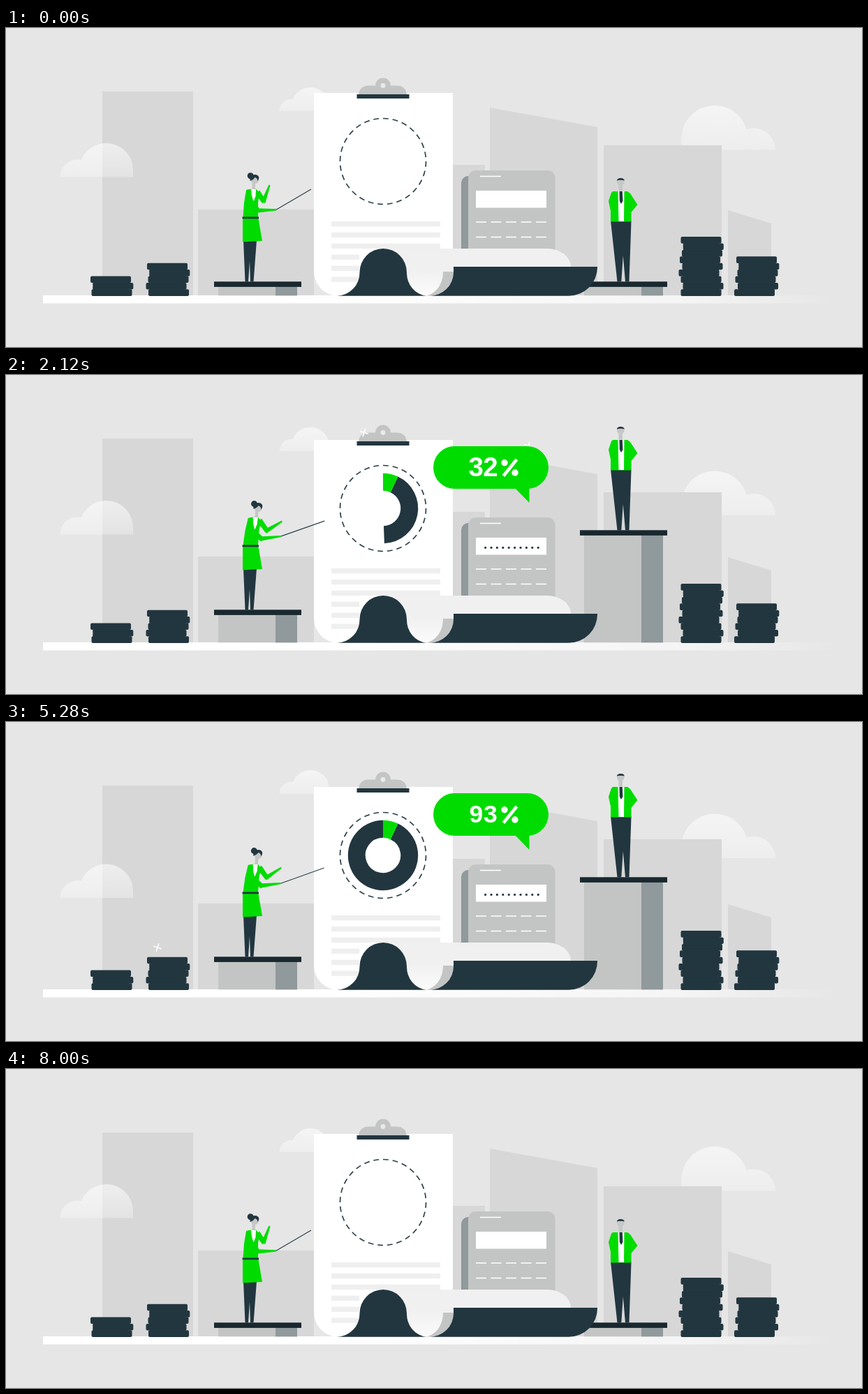
Write an HTML page that moves like this. It is 1226 by 457 pixels and loops after 8040 ms.

```html
<!DOCTYPE html>
<html lang="en">
<head>
<meta charset="utf-8">
<title>Report</title>
<style>
html, body { margin: 0; width: 100%; height: 100%; overflow: hidden; background: #e6e6e6; }
svg { display: block; width: 100vw; height: 100vh; }
text { font-family: "Liberation Sans", Arial, sans-serif; font-weight: 700; }
.dark { fill: #22363f; }
.green { fill: #00dc00; }
.grey { fill: #c3c5c4; }
.skin { fill: #c6c7c7; }
.white { fill: #fff; }
.town { fill: #d7d7d7; }
.side { fill: #90999b; }
.top { fill: #18282e; }
</style>
</head>
<body>
<svg viewBox="0 0 1226 457">
  <defs>
    <linearGradient id="mist" x2="0" y2="1">
      <stop offset="0" stop-color="#fff" stop-opacity=".58"/>
      <stop offset="1" stop-color="#fff" stop-opacity=".3"/>
    </linearGradient>
    <linearGradient id="floor">
      <stop offset=".35" stop-color="#fff"/>
      <stop offset=".8" stop-color="#fff" stop-opacity=".6"/>
      <stop offset="1" stop-color="#fff" stop-opacity="0"/>
    </linearGradient>
    <linearGradient id="roll" x2="0" y2="1">
      <stop offset=".45" stop-color="#f0f0f0"/>
      <stop offset="1" stop-color="#fbfbfb"/>
    </linearGradient>
  </defs>

  <path id="cloud3" fill="url(#mist)"/>
  <path class="town" d="M138 91H268V383H138ZM275 260H441V383H275ZM640 196H686V383H640ZM693 114L847 142V383H693ZM856 168H1025V383H856ZM1034 261L1096 280V383H1034Z"/>
  <path id="cloud1" fill="url(#mist)"/>
  <path id="cloud2" fill="url(#mist)"/>
  <rect x="53" y="383" width="1140" height="11.500" fill="url(#floor)"/>
  <g id="coins" class="dark"></g>

  <g id="standL"></g>
  <g id="standR"></g>

  <g id="man">
    <path class="dark" d="M866 276H895.500L895 292 892.500 363.500H887L883.800 326 881.300 363.500H875.500Z"/>
    <g id="chest">
      <path class="green" d="M869 234H890L894 237 904.500 253 895.500 264V277.500H866V262L863 248 867 236Z"/>
      <path class="white" d="M876.500 234H885.500L885 277H877.500Z"/>
      <path class="dark" d="M878.500 234H882.800L883.500 248 881 252 878.800 248Z"/>
    </g>
    <g id="manHead">
      <path class="skin" d="M877.500 222h5.500v11.500h-5.500Z"/>
      <circle class="skin" cx="880.300" cy="220.300" r="5.400"/>
      <path class="dark" d="M874.800 218.500Q875.500 215 880.300 215T885.800 218.500Q880.300 216.800 874.800 218.500Z"/>
    </g>
  </g>

  <path class="side" d="M690 212H662A10 10 0 0 0 652 222V330H690Z"/>
  <rect class="grey" x="662" y="204" width="124.500" height="135" rx="11"/>
  <rect class="white" x="673" y="233" width="101" height="24.500"/>
  <path stroke="#fff" stroke-width="1.500" d="M679 212.500H709"/>
  <path stroke="#fff" stroke-width="1.500" stroke-dasharray="15 6.500" d="M673 278H774M673 299.500H774"/>
  <g id="dots" class="dark"></g>
  <path id="caret" fill="none" stroke="#22363f" stroke-width="1.300" d="M755.500 239.500L749.500 244 755.500 248.500"/>

  <path class="white" d="M441 93H640V350H507A33 33 0 0 1 474 383.500A34 35 0 0 1 441 348Z"/>
  <g id="lines" fill="#efefef"></g>
  <path fill="url(#roll)" d="M540 316A34 34 0 0 1 574 350A30 33 0 0 0 602 383.500A30 34 0 0 0 626 349H641V342H809A34 26 0 0 0 775 316Z"/>
  <path class="grey" d="M626 349H641A34 34 0 0 1 607 383.500H600A27 34 0 0 0 626 349Z"/>
  <path class="dark" d="M474 383.700A33 33 0 0 0 506.500 350A33.700 34 0 0 1 574 350A31 33 0 0 0 602 383.700ZM641 342H847A41 41 0 0 1 806 383.700H606A34 34 0 0 0 641 349Z"/>
  <path class="grey" d="M505 96Q506 82.500 520 82.500H529A11 11 0 1 1 551 82.500H559Q573 82.500 574 96Z"/>
  <circle cx="540" cy="82.500" r="3.400" fill="#e9e9e9"/>
  <rect class="dark" x="502.500" y="95" width="75" height="6"/>
  <circle cx="540" cy="191" r="61.500" fill="none" stroke="#2c4149" stroke-width="1.700" pathLength="392" stroke-dasharray="8 6"/>
  <path id="ringDark" fill="none" stroke="#22363f" stroke-width="25"/>
  <path id="ringGreen" fill="none" stroke="#00dc00" stroke-width="25"/>

  <g id="woman">
    <path class="dark" d="M340 304H359L354.500 363.500H350L349 334 347 363.500H342.500Z"/>
    <path id="farArm" class="green"/>
    <g id="jacket">
      <path class="green" d="M344 232L348 231 358 230.500 363 236 361 250V271H339.500L341 250Z"/>
      <path class="white" d="M351 231H358L357.500 241 354.500 249 352 240Z"/>
    </g>
    <path id="nearArm" class="green"/>
    <path class="green" d="M339 273H361.500L367 305 339 306.500Z"/>
    <rect class="dark" x="338.500" y="270.500" width="23.500" height="2.700"/>
    <path id="pointer" stroke="#2c4149" stroke-width="1.200"/>
    <g id="womanHead">
      <path class="skin" d="M352.500 220h4.500v11h-4.500Z"/>
      <circle class="skin" cx="356.300" cy="217.500" r="5.600"/>
      <circle class="dark" cx="350.200" cy="211.800" r="4.500"/>
      <path class="dark" d="M349.500 219Q348.500 210.500 356 210Q362.500 210 362.300 215.500L360.500 219.500Q360.500 215 356.500 214Q354 218 349.500 219Z"/>
    </g>
  </g>

  <g id="sparks" fill="none" stroke="#fff" stroke-linecap="round"></g>

  <g id="bubble">
    <rect class="green" x="612" y="102" width="165" height="61" rx="30.500"/>
    <path class="green" d="M728 161H749.500V183Z"/>
    <text id="count" class="white" text-anchor="middle"></text>
    <path stroke="#fff" stroke-width="4.600" d="M712.500 144.500L731.500 121"/>
    <circle class="white" cx="714" cy="125.700" r="4.700"/>
    <circle class="white" cx="729" cy="140" r="4.700"/>
  </g>
</svg>
<script>
const LOOP = 8040, STEP = 40;
const $ = id => document.getElementById(id);
const set = (el, attrs) => { for (const k in attrs) el.setAttribute(k, attrs[k]); };
const add = (parent, tag, attrs) => {
  const el = document.createElementNS("http://www.w3.org/2000/svg", tag);
  set(el, attrs);
  return parent.appendChild(el);
};
const show = (el, on) => set(el, { visibility: on ? "visible" : "hidden" });
const move = (el, transform) => set(el, { transform });
const mix = (a, b, p) => a + (b - a) * p;
const mixAt = (a, b, p) => a.map((v, i) => mix(v, b[i], p));
const ease = (t, a, b) => {
  const p = Math.min(1, Math.max(0, (t - a) / (b - a)));
  return p * p * (3 - 2 * p);
};
// rises over a..b, falls over c..d
const pulse = (t, a, b, c, d) => ease(t, a, b) - ease(t, c, d);

// coins lie unevenly, every pile in the same rhythm
const JITTER = [0, 3.3, 1.5, -1.5, 2, -3, 0, 3, 0];
const pile = (left, n) => {
  for (let i = 0; i < n; i++) {
    const x = left + JITTER[i], y = 383.7 - (n - i) * 9.4;
    add($("coins"), "rect", { x, y, width: 58, height: 9.6, rx: 2 });
    if (i) add($("coins"), "rect", { x: left + 3.5, y: y - 3, width: 51, height: 6 });
  }
};
pile(121, 3);
pile(202, 5);
pile(966.5, 9);
pile(1046, 6);

for (let i = 0; i < 6; i++)
  add($("lines"), "rect", { x: 466, y: 277 + i * 15.9, width: i < 3 ? 156 : 40, height: 7.3 });

const dots = Array.from({ length: 10 }, (_, i) =>
  add($("dots"), "rect", { x: 685.2 + i * 8.4, y: 246, width: 2.8, height: 2.8 }));

const makeStand = (id, x) => {
  const part = (name, left, width) => add($(id), "rect", { class: name, x: x + left, width, height: 7.6 });
  const shaft = [part("grey", 6, 113), part("side", 88, 31)];
  return { shaft, bar: part("top", 0, 125) };
};
const standL = makeStand("standL", 298), standR = makeStand("standR", 822);
const lift = (stand, rider, up) => {
  const y = 363.3 - up;
  set(stand.bar, { y });
  for (const el of stand.shaft) set(el, { y: y + 7, height: 376.3 - y });
  move(rider, `translate(0 ${-up})`);
};

// a tall dome and a low half circle on one base line
const cloud = (id, x, r, h, x2, r2, base) => set($(id), {
  d: `M${x - r} ${base}V${base - h + r}a${r} ${r} 0 0 1 ${2 * r} 0V${base}Z` +
     `M${x2 - r2} ${base}a${r2} ${r2} 0 0 1 ${2 * r2} 0Z`
});

// slants a part sideways by dx at the given height above its fixed waist
const slant = (id, waist, height, dx) => {
  const k = -dx / height;
  move($(id), `matrix(1 0 ${k} 1 ${-k * waist} 0)`);
};

const taper = ([ax, ay], [bx, by], wa, wb) => {
  const len = Math.hypot(bx - ax, by - ay);
  const nx = (by - ay) / len / 2, ny = (ax - bx) / len / 2;
  return `M${ax + nx * wa} ${ay + ny * wa}L${bx + nx * wb} ${by + ny * wb} ` +
         `${bx - nx * wb} ${by - ny * wb} ${ax - nx * wa} ${ay - ny * wa}Z`;
};
const limb = (id, shoulder, elbow, hand) => set($(id), {
  d: taper(shoulder, mixAt(shoulder, elbow, 1.1), 8, 6.5) + taper(mixAt(hand, elbow, 1.08), hand, 6.5, 2.2)
});

const arc = (id, from, to) => {
  const at = deg => {
    const a = deg * Math.PI / 180;
    return `${540 + 37.7 * Math.sin(a)} ${191 - 37.7 * Math.cos(a)}`;
  };
  to = Math.min(to, 359.99);
  set($(id), { d: to - from < .05 ? "" : `M${at(from)}A37.7 37.7 0 ${to - from > 180 ? 1 : 0} 1 ${at(to)}` });
};

const makeSpark = (x, y, born, gone) => ({ x, y, born, gone, el: add($("sparks"), "path", { d: "M-5.500 0H5.500M0 -5.500V5.500", "stroke-width": 1.6 }) });
const sparks = [
  makeSpark(513, 82.5, 860, 3600),
  makeSpark(748, 101.5, 1040, 2700),
  makeSpark(1060.5, 327, 2200, 5000),
  makeSpark(217, 323, 4250, 5700)
];

function drawPeople(t) {
  const rise = pulse(t, 160, 1440, 5666, 6919);
  lift(standL, $("woman"), 27 * rise);
  lift(standR, $("man"), 141 * rise);

  const lean = pulse(t, 200, 700, 1250, 1900) + pulse(t, 5350, 5850, 6900, 7700);
  const look = pulse(t, 400, 900, 1250, 1900) + pulse(t, 4150, 4450, 4900, 5300) + pulse(t, 5800, 6350, 7200, 7920);
  slant("chest", 277, 43, -3.7 * lean);
  move($("manHead"), `translate(${-3.5 * lean - 1.5 * look} ${.5 * look}) rotate(${-14 * look} 880.3 221)`);

  const point = pulse(t, 1150, 2300, 5150, 5850);
  const wave = pulse(t, 800, 2400, 5100, 5850);
  const hand = mixAt([387, 260.3], [394, 258], point);
  const tip = mixAt([437, 231], [457.5, 236.5], point);
  slant("jacket", 271, 40, 3 * point);
  limb("farArm", [360 + 3 * point, 235], mixAt([369, 248], [374, 250], wave), mixAt([377.5, 225], [397, 237.5], wave));
  limb("nearArm", [349, 247], mixAt([361, 261.5], [366, 261.5], point), hand);
  set($("pointer"), { d: `M${hand}L${tip}` });
  move($("womanHead"), `translate(${4.500 * point}) rotate(${4 * point} 355 228)`);
}

function drawReport(t) {
  const typed = Math.floor(t < 4000 ? (t - 330) / 100 : (6420 - t) / 40);
  dots.forEach((dot, i) => show(dot, i < typed));
  show($("caret"), t > 330 && t < 4000 && typed < 10);
  move($("caret"), `translate(${(typed - 8) * 8.4})`);

  const slice = 25.2, head = 360 * ease(t, 1500, 2750), tail = 360 * ease(t, 5585, 6300);
  arc("ringGreen", Math.min(tail, slice), Math.min(head, slice));
  arc("ringDark", Math.max(tail, slice), Math.max(head, slice));

  // the bubble grows from the tip of its tail
  const size = pulse(t, 1500, 2050, 5884, 6344);
  move($("bubble"), `translate(749.5 183) scale(${size}) translate(-749.5 -183)`);
  show($("bubble"), size > .002);
  const n = Math.round(93 * ease(t, 1650, 2850));
  const font = 38.5 - 5.5 * pulse(t, 3400, 4200, 4900, 5700);
  $("count").textContent = n;
  set($("count"), { x: n > 9 ? "673.3 694" : "694", y: 131.7 + font * .355, "font-size": font });
}

function draw(t) {
  cloud("cloud1", 143.5, 38.5, 48.5, 102.5, 25, 213.5 + 38.5 * pulse(t, 0, 5000, 5280, 8000));
  cloud("cloud2", 436, 27, 34, 408.5, 17, 119 - 19 * pulse(t, 0, 4000, 4380, 8000));
  cloud("cloud3", 1015, 47.5, 63.5, 1071, 31, 174.5 + 34.7 * pulse(t, 0, 3100, 3100, 8040));
  drawPeople(t);
  drawReport(t);
  for (const { x, y, born, gone, el } of sparks) {
    const k = pulse(t, born, born + 380, gone - 380, gone);
    move(el, `translate(${x} ${y}) rotate(${15 + (t - born) / 400}) scale(${k})`);
    show(el, k > .01);
  }
}

const start = performance.now();
function tick() {
  const t = (performance.now() - start) % LOOP;
  draw(Math.floor(t / STEP) * STEP);
  requestAnimationFrame(tick);
}
tick();
</script>
</body>
</html>
```
